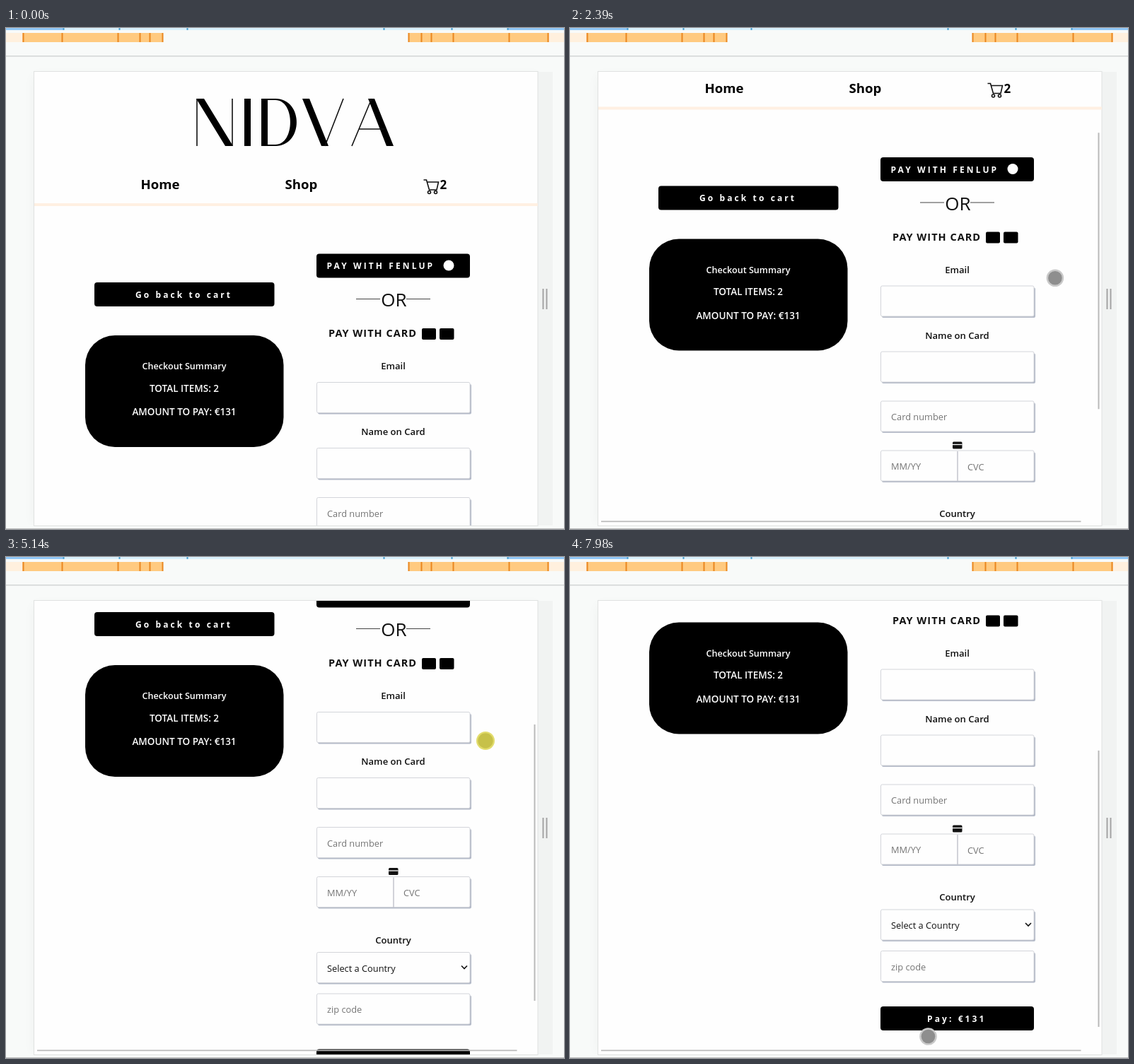
Recreate the animation shown at these times as an HTML page. Size 789x709 px, loop 8 s.

```html
<!DOCTYPE html>
<html lang="en">
<head>
<meta charset="utf-8">
<title>Checkout page</title>
<style>
  html, body { margin: 0; width: 100%; height: 100%; overflow: hidden; background: #f8faf9; }
  svg { display: block; }
  text { font-family: "Open Sans", "Noto Sans", sans-serif; font-size: 12.8px; fill: #111; }
  .nav { font-weight: 700; font-size: 18.6px; fill: #000; }
  .count { font-weight: 700; font-size: 17px; fill: #000; }
  .label { font-weight: 600; font-size: 13.1px; text-anchor: middle; }
  .heading { font-weight: 600; font-size: 12.6px; text-anchor: middle; }
  .total { font-weight: 600; font-size: 13.5px; text-anchor: middle; }
  .heading, .total, .button text { fill: #fff; }
  .button text { font-weight: 700; font-size: 12px; letter-spacing: 3.1px; }
  .or { font-weight: 500; font-size: 26px; text-anchor: middle; }
  .card { font-weight: 700; font-size: 14.5px; letter-spacing: 1px; }
  .footer { font-weight: 700; font-size: 13px; }
  .line { fill: none; stroke: #111; stroke-width: 1.6; }
</style>
</head>
<body>
<svg width="789" height="709" viewBox="0 0 789 709">
  <defs>
    <clipPath id="view"><rect x="40" y="62" width="712" height="642"/></clipPath>
    <filter id="soft" x="-10%" y="-10%" width="120%" height="120%"><feGaussianBlur stdDeviation="9"/></filter>
    <g id="wordmark" role="img" aria-label="NIDVA">
      <path d="M0 0H11L52 67H41ZM68 0H77V67H68ZM150 0H160L187 67H177ZM243 0H252L279 67H269Z"/>
      <path fill-rule="evenodd" d="M92 0H112C152 0 152 67 112 67H92ZM101 2H112C140 2 140 65 112 65H101Z"/>
      <path class="line" d="M1 0V67M51 0V67M182 67L208 0M220 67L248 0M230 43H266"/>
    </g>
  </defs>

  <rect width="789" height="709" fill="#f8faf9"/>
  <g id="ruler"></g>
  <rect y="39" width="789" height="1.5" fill="#d3d6d5"/>
  <rect x="40" y="68" width="712" height="634" opacity=".045" filter="url(#soft)"/>
  <rect y="704" width="789" height="5" fill="#f8faf9"/>
  <rect x="752" y="62" width="21" height="642" fill="#f1f3f2"/>
  <path d="M759.5 369V398M764.5 369V398" stroke="#a3a3a3" stroke-width="2"/>
  <rect y="708" width="789" height="1" fill="#bdbdbd"/>
  <rect x="39.5" y="61.5" width="712.5" height="643" fill="#fefefe" stroke="#e0e2e1"/>

  <g clip-path="url(#view)">
    <g id="page">
      <use href="#wordmark" x="269" y="100"/>
      <text class="nav" x="190.5" y="228">Home</text>
      <text class="nav" x="394.5" y="228">Shop</text>
      <path class="line" d="M590.5 215H594.5L598.5 229H609L611.5 218H595.5"/>
      <circle class="line" cx="598.5" cy="232.5" r="2"/>
      <circle class="line" cx="607.5" cy="232.5" r="2"/>
      <text class="count" x="613.5" y="228">2</text>
      <rect x="40" y="248" width="712" height="4" fill="#fff0e2"/>

      <rect x="112" y="435" width="280.5" height="158" rx="42"/>
      <text class="heading" x="252" y="483">Checkout Summary</text>
      <text class="total" x="252" y="514.5">TOTAL ITEMS: 2</text>
      <text class="total" x="252" y="548">AMOUNT TO PAY: €131</text>

      <g id="buttons"></g>
      <circle cx="626" cy="336" r="7.5" fill="#fff"/>
      <path d="M495 383.5H529M566 383.5H600" stroke="#444"/>
      <text class="or" x="548.5" y="394">OR</text>
      <text class="card" x="456" y="437">PAY WITH CARD</text>
      <rect x="588" y="425" width="20" height="16" rx="2"/>
      <rect x="613" y="425" width="20.5" height="16" rx="2"/>

      <text class="label" x="547.5" y="483">Email</text>
      <text class="label" x="547.5" y="576">Name on Card</text>
      <text class="label" x="547.5" y="828.5">Country</text>
      <g id="fields"></g>
      <path d="M548 735.5V778" stroke="#c3c5cc" stroke-width="1.5"/>
      <text x="562" y="762" fill="#757575" style="fill:#757575">CVC</text>
      <rect x="541" y="722" width="13.5" height="10" rx="1.5" fill="#111"/>
      <path d="M541 726H554.5" stroke="#fff" stroke-width="1.3"/>
      <path class="line" d="M644 860.5L648 864.5L652 860.5"/>

      <path d="M258 1053.5H552" stroke="#eee"/>
      <text class="footer" x="341" y="1074">2021 ©</text>
      <use href="#wordmark" transform="translate(389 1056) scale(.29)"/>
    </g>
    <g id="bars" fill="#b9b9b9">
      <rect id="thumb" x="746.5" width="2" height="391"/>
      <rect x="44" y="697.5" width="678.5" height="1.7"/>
    </g>
  </g>
  <g id="cursor"><circle id="ring"/><circle id="core"/></g>
</svg>

<script>
const $ = id => document.getElementById(id);
const clamp = v => Math.min(1, Math.max(0, v));
const rect = (x, y, w, h, fill, more = '') =>
  `<rect x="${x}" y="${y}" width="${w}" height="${h}" fill="${fill}" ${more}/>`;

// The breakpoint ruler is symmetric about its centre.
const mirrored = (x, y, w, h, fill) =>
  rect(395.5 - x, y, w, h, fill) + rect(395.5 + x - w, y, w, h, fill);
const ticks = (offsets, y, h, fill) => offsets.map(x => mirrored(x, y, 2, h, fill)).join('');
$('ruler').innerHTML =
  rect(0, 0, 789, 3, '#d9f1fd') + mirrored(395.5, 0, 81, 3, '#92c8f7') +
  ticks([315, 236, 140], 0, 3, '#4a9fd0') +
  mirrored(395.5, 7, 24, 13, '#fff0de') + mirrored(372, 7, 198, 13, '#ffca80') +
  ticks([372, 317, 238, 207, 193, 175], 7, 13, '#e9861f');

const button = (x, y, w, textX, words) => `<g class="button">
  ${rect(x, y, w, 34, '#000', 'rx="4"')}<text x="${textX}" y="${y + 21.7}">${words}</text></g>`;
$('buttons').innerHTML =
  button(439, 319.5, 217, 453.5, 'PAY WITH FENLUP') +
  button(125, 360, 254.5, 183, 'Go back to cart') +
  button(439, 978.5, 217, 505, 'Pay: €131');

const field = (y, words = '', color = '#757575') =>
  rect(441, y + 2, 217, 42.5, '#b4bac8', 'rx="2"') +
  rect(439.5, y - .5, 216.5, 43, '#fefefe', 'rx="2" stroke="#d3d5da"') +
  `<text x="454" y="${y + 26.5}" style="fill:${color}">${words}</text>`;
$('fields').innerHTML = field(502) + field(595) + field(665, 'Card number') +
  field(735, 'MM/YY') + field(842, 'Select a Country', '#111') + field(900.5, 'zip code');

// Pointer moves; the page scroll and the scroll bars follow from them.
const moves = [];
const hover = (start, end, x, y) => moves.push({ start, end, x, y, down: false });
const drag = (start, end, x, y) => moves.push({ start, end, x, y, down: true });
hover(530, 600, 669, 448);
hover(1050, 1190, 682, 476);
drag(1190, 1500, 682, 476);
drag(1500, 2200, 684, 320);
hover(2200, 2800, 690, 426);
drag(3000, 3840, 685.5, 351.5);
drag(3880, 4530, 683, 306);
drag(4790, 5140, 678, 260);
drag(5200, 5270, 678, 266);
hover(5470, 6080, 706, 349.5);
drag(6270, 6470, 706, 349.5);
drag(6470, 6870, 697, 241);
drag(7280, 7630, 703, 268.4);
hover(7760, 7980, 506.5, 678.5);

const SLOP = 11, GAIN = .94;

function pose(t) {
  let x = 669, y = 469, scroll = 0, down = false, pressY = 0, base = 0, scrolledAt = -1000;
  for (const m of moves) {
    if (t < m.start) break;
    if (m.down && !down) { pressY = y; base = scroll; }
    down = m.down;
    const p = clamp((t - m.start) / (m.end - m.start));
    x += (m.x - x) * p;
    y += (m.y - y) * p;
    if (down && pressY - y > SLOP) {
      scroll = base + GAIN * (pressY - y - SLOP);
      scrolledAt = Math.min(t, m.end);
    }
  }
  return { x, y, scroll: Math.round(scroll * 2) / 2, down, bars: clamp(1 - (t - scrolledAt - 350) / 250) };
}

function disc(id, r, fill) {
  $(id).setAttribute('r', r);
  $(id).setAttribute('fill', fill);
}

function draw(now) {
  const t = now % 8000;
  const { x, y, scroll, down, bars } = pose(t);
  $('page').setAttribute('transform', `translate(0 ${-scroll})`);
  $('thumb').setAttribute('y', 65 + .61 * scroll);
  $('bars').setAttribute('opacity', bars);
  $('cursor').setAttribute('transform', `translate(${x} ${y})`);
  $('cursor').setAttribute('opacity', t < 530 ? 0 : 1);
  disc('ring', down ? 13 : 12.3, down ? '#e2dc6c' : '#c9c9c9');
  disc('core', down ? 10.7 : 9.8, down ? '#c7c149' : '#8e8e8e');
  requestAnimationFrame(draw);
}
requestAnimationFrame(draw);
</script>
</body>
</html>
```
